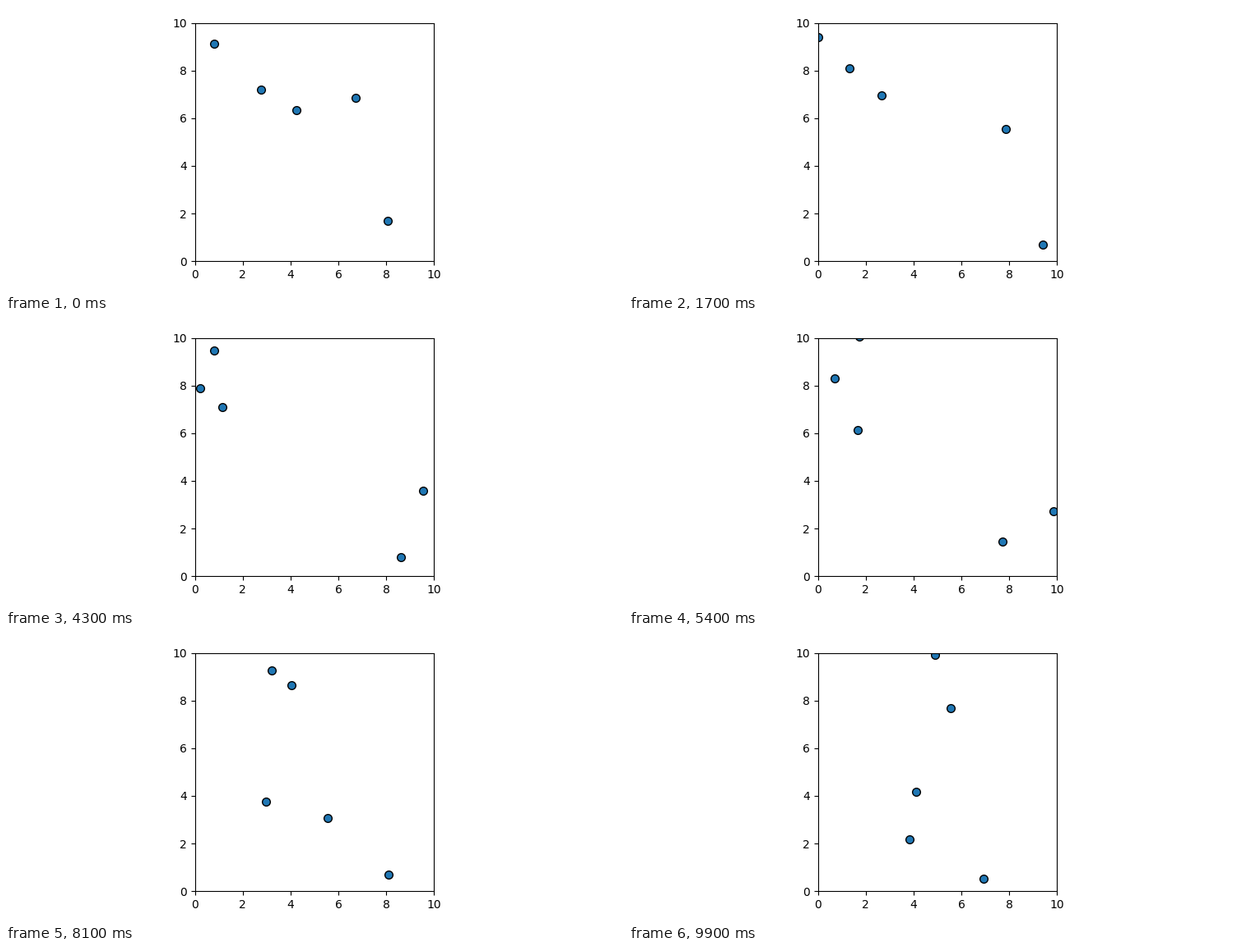
Animation, 750 px wide and 350 px high, one loop 10000 ms. Source, as a matplotlib script:

```python
import matplotlib.pyplot as plt
import numpy as np
from matplotlib.animation import FuncAnimation

plt.rcParams["figure.figsize"] = [7.50, 3.50]
plt.rcParams["figure.dpi"] = 100
plt.rcParams["figure.autolayout"] = True

SIZE = 10
STEPS = 100
SPEED = 0.1

# Starting point and heading in degrees of each ball
balls = [
    (0.8165, 9.128, 118.49),
    (2.755, 7.205, 148.26),
    (4.23, 6.337, 158.84),
    (6.735, 6.845, -49.45),
    (8.045, 1.71, -36.7),
]
x, y, heading = np.array(balls).T
start = np.column_stack([x, y])
angle = np.radians(heading)
velocity = SPEED * np.column_stack([np.cos(angle), np.sin(angle)])

# A ball turns back at its first step beyond the wall ahead
wall = np.where(velocity > 0, SIZE, 0)
turn = np.ceil((wall - start) / velocity)


def position(step):
    return start + velocity * (turn - abs(step - turn))


fig, ax = plt.subplots()
ax.set(xlim=(0, SIZE), ylim=(0, SIZE), aspect="equal")
ticks = range(0, SIZE + 1, 2)
ax.set_xticks(ticks)
ax.set_yticks(ticks)
dots = ax.scatter(x, y, s=49, c="tab:blue", edgecolors="black", linewidths=1)


def update(step):
    dots.set_offsets(position(step))
    return dots,


anim = FuncAnimation(fig, update, frames=STEPS, interval=1000 * 10 // STEPS,
                     repeat=True, repeat_delay=0)
plt.show()
```
